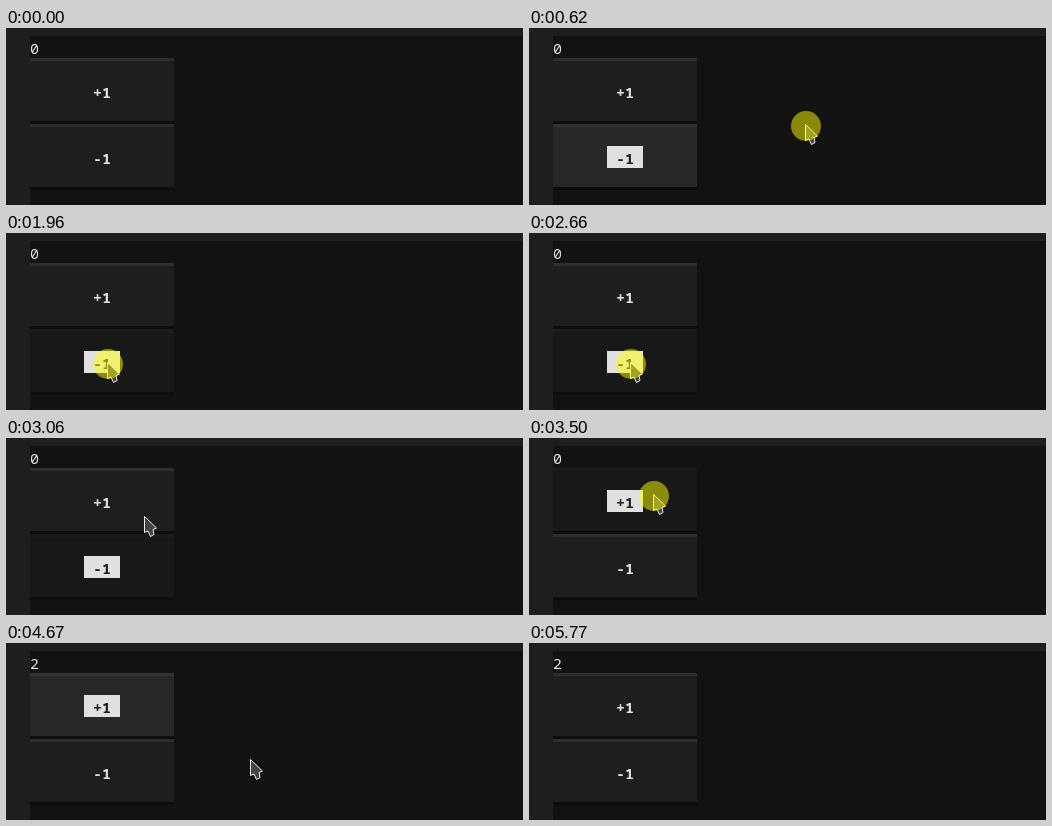
These frames come from a looping animation (517 by 177 pixels, 5.89 s). An HTML page with a canvas:

```html
<!DOCTYPE html>
<html lang="en">
<head>
<meta charset="utf-8">
<title>Counter</title>
<style>
  html, body { margin: 0; width: 100%; height: 100%; overflow: hidden; background: #121212; }
  canvas { display: block; }
</style>
</head>
<body>
<canvas id="stage" width="517" height="177"></canvas>
<script>
const ctx = document.getElementById('stage').getContext('2d');
const LOOP = 5890, TICK = 40, HOVER_LAG = 80;
const FONT = '15px "Noto Sans Mono", monospace';
const LIGHT = '#e0e0e0', SURFACE = '#1e1e1e';
const BUTTONS = [{ label: '+1', top: 30 }, { label: '-1', top: 96 }];

const linear = p => p;
const easeIn = p => p * p;
const easeOut = p => 1 - (1 - p) ** 2;
const easeInOut = p => p * p * (3 - 2 * p);

// Pointer moves: first tick, number of ticks, destination, easing.
const ENTER = 210, LEAVE = 4790, ENTRY_POINT = [354, 162];
const MOVES = [
  [250, 5, 276, 96, easeOut],
  [900, 12, 101, 129, easeInOut],
  [2860, 6, 138, 78, easeIn],
  [3100, 3, 150, 33, easeOut],
  [3300, 3, 124, 56, linear],
  [4470, 8, 338, 162, easeIn]
];

// Mouse down, mouse up, end of the pressed look.
const CLICKS = [
  [620, 740, 740], [1420, 1540, 1750], [1960, 2120, 2330],
  [2660, 2780, 2990], [3460, 3580, 3780], [4110, 4270, 4470]
];

function pointerAt(t) {
  if (t < ENTER || t >= LEAVE) return null;
  let [x, y] = ENTRY_POINT;
  for (const [start, ticks, toX, toY, ease] of MOVES) {
    if (t < start) break;
    const p = ease(Math.min(1, (Math.floor((t - start) / TICK) + 1) / ticks));
    x += (toX - x) * p;
    y += (toY - y) * p;
  }
  return { x: Math.round(x), y: Math.round(y) };
}

function hoveredAt(t) {
  const p = pointerAt(t - HOVER_LAG);
  if (!p || p.x < 24 || p.x >= 168) return -1;
  return BUTTONS.findIndex(b => p.y >= b.top && p.y < b.top + 66);
}

function focusedAt(t) {
  if (t < 620 || t >= 5770) return -1;
  return t < 3460 ? 1 : 0;
}

function rect(color, x, y, w, h) {
  ctx.fillStyle = color;
  ctx.fillRect(x, y, w, h);
}

function text(string, x, y, color, weight = '') {
  ctx.font = `${weight} ${FONT}`;
  ctx.fillStyle = color;
  ctx.fillText(string, x, y);
}

function drawButton({ label, top }, hovered, focused, pressed) {
  const face = hovered ? '#181818' : focused ? '#282828' : SURFACE;
  const edge = hovered ? '#1c1c1c' : focused ? '#323232' : '#2d2d2d';
  rect(face, 24, top, 144, 66);
  rect(edge, 24, top, 144, 3);
  rect(pressed ? '#383838' : '#0d0d0d', 24, top + 63, 144, 3);
  if (focused) rect(LIGHT, 78, top + 22, 36, 22);
  text(label, 87, top + 40, focused ? SURFACE : LIGHT, 'bold');
  if (pressed) rect('rgba(18,18,18,.3)', 24, top, 144, 66);
}

const ARROW = new Path2D('M.5 .5V16.5L4 15L6.5 20.5L10 18.5L9 13.5L12.5 12Z');

function drawPointer({ x, y }, down) {
  ctx.save();
  ctx.translate(x, y);
  ctx.fillStyle = '#444';
  ctx.strokeStyle = '#eee';
  ctx.fill(ARROW);
  ctx.stroke(ARROW);
  if (down) {
    ctx.fillStyle = 'rgba(255,255,0,.5)';
    ctx.beginPath();
    ctx.arc(1, 2, 15, 0, 2 * Math.PI);
    ctx.fill();
  }
  ctx.restore();
}

function draw(t) {
  const hovered = hoveredAt(t), focused = focusedAt(t), pointer = pointerAt(t);
  const down = CLICKS.some(([from, to]) => t >= from && t < to);
  const pressed = CLICKS.some(([, from, to]) => t >= from && t < to);
  const count = t < 3620 ? 0 : t < 4310 ? 1 : 2;

  rect(SURFACE, 0, 0, 517, 177);
  rect('#121212', 24, 8, 493, 169);
  text(count, 24, 26, LIGHT);
  BUTTONS.forEach((button, i) =>
    drawButton(button, i === hovered, i === focused, pressed && i === focused));
  if (pointer) drawPointer(pointer, down);
}

function frame() {
  draw(performance.now() % LOOP);
  requestAnimationFrame(frame);
}
frame();
</script>
</body>
</html>
```
